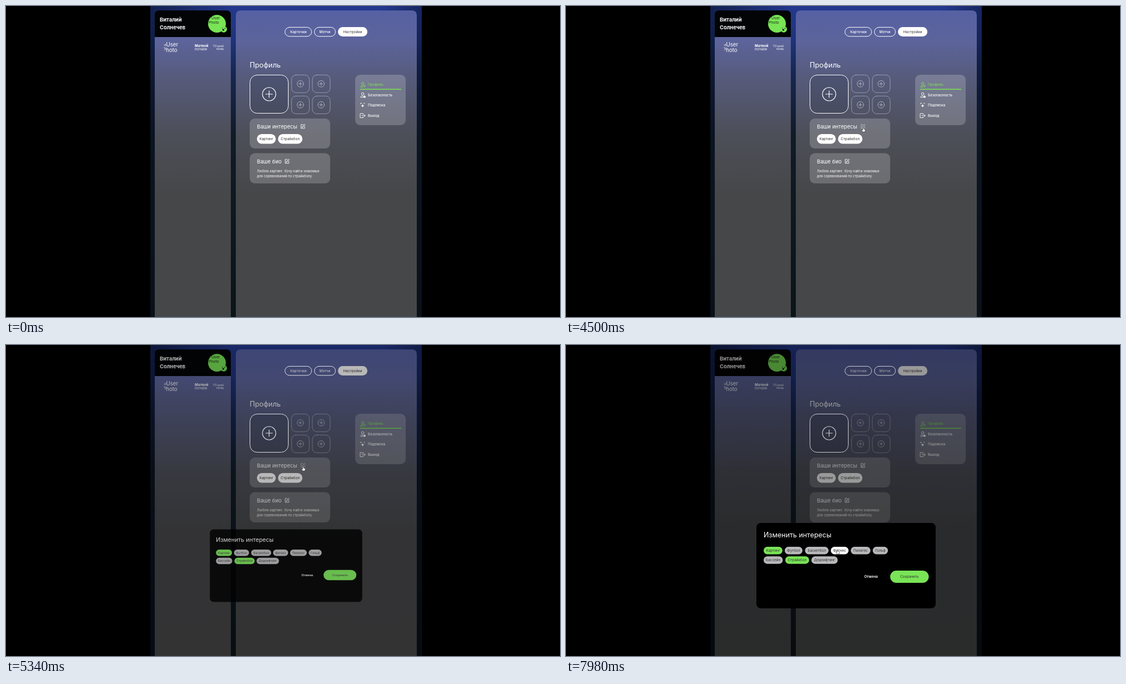
These frames come from a looping animation (998 px wide and 561 px high, 8000 ms). An HTML page:

```html
<!DOCTYPE html>
<html lang="ru">
<head>
<meta charset="utf-8">
<title>Профиль</title>
<style>
  html, body { margin: 0; width: 100%; height: 100%; overflow: hidden; background: #000; }
  svg { display: block; width: 100vw; height: 100vh; font-family: Inter, "Open Sans", sans-serif; }
  .line { fill: none; stroke: #fff; stroke-linecap: round; stroke-linejoin: round; }
</style>
</head>
<body>
<svg id="stage" viewBox="0 0 998 561">
  <defs>
    <linearGradient id="pageFill" gradientUnits="userSpaceOnUse" x1="0" y1="0" x2="0" y2="561">
      <stop offset="0" stop-color="#24388f"/><stop offset=".1" stop-color="#1f347d"/>
      <stop offset=".22" stop-color="#172650"/><stop offset=".42" stop-color="#101b27"/>
      <stop offset="1" stop-color="#0c1418"/>
    </linearGradient>
    <linearGradient id="pageEdges">
      <stop offset="0" stop-color="#050d1c" stop-opacity=".55"/><stop offset=".3" stop-color="#050d1c" stop-opacity="0"/>
      <stop offset=".85" stop-color="#050d1c" stop-opacity="0"/><stop offset="1" stop-color="#050d1c" stop-opacity=".4"/>
    </linearGradient>
    <linearGradient id="panelFill" gradientUnits="userSpaceOnUse" x1="0" y1="8" x2="0" y2="561">
      <stop offset="0" stop-color="#5661a3"/><stop offset=".1" stop-color="#5c649b"/>
      <stop offset=".22" stop-color="#565b7b"/><stop offset=".4" stop-color="#4d4f59"/>
      <stop offset=".6" stop-color="#464749"/><stop offset="1" stop-color="#464748"/>
    </linearGradient>
    <clipPath id="avatarClip"><circle cx="298" cy="73" r="14"/></clipPath>
  </defs>
  <g id="page"></g>
  <rect id="shade" x="260" width="489" height="561"/>
  <g id="outlines" class="line"></g>
  <g id="dialog"></g>
  <g id="cursor">
    <path id="hand" fill="#fff" stroke="#111" stroke-width=".5" stroke-linejoin="round"
      d="M-.8 .2Q0-.6.8.2V3L3.4 3.6Q4 3.9 3.8 5L3.2 8H-.8L-2.8 5Q-2.8 4-1.8 4.4L-.8 5.2Z"/>
    <path id="arrow" fill="#fff" stroke="#111" stroke-width=".5" d="M0 0V6.6L1.5 5.2 2.5 7.4 3.5 7 2.5 4.8H4.6Z"/>
  </g>
</svg>
<script>
const $ = id => document.getElementById(id);
const GREEN = '#79e456';

const text = (x, y, size, content, { fill = '#fff', weight = 400, anchor = 'start' } = {}) =>
  `<text x="${x}" y="${y}" font-size="${size}" fill="${fill}" font-weight="${weight}" text-anchor="${anchor}">${content}</text>`;
const box = (x, y, w, h, r, attrs = 'fill="#fff"') =>
  `<rect x="${x}" y="${y}" width="${w}" height="${h}" rx="${r}" ${attrs}/>`;
const line = (d, width = 1, attrs = '') => `<path class="line" d="${d}" stroke-width="${width}" ${attrs}/>`;
const card = (x, y, w, h) => box(x, y, w, h, 9, 'fill="#fff" fill-opacity=".2"');
const pill = (x, y, w, h, label, { fill = '#fff', color = '#333', size = 6.4, id = '' } = {}) =>
  box(x, y, w, h, h / 2, `fill="${fill}" id="${id}"`) +
  text(x + w / 2, y + h / 2 + size * .36, size, label, { fill: color, anchor: 'middle' });

const plus = (x, y, r, width, attrs = '') =>
  `<g class="line" stroke-width="${width}" ${attrs}><circle cx="${x}" cy="${y}" r="${r}"/>
   <path d="M${x - r / 2} ${y}h${r}M${x} ${y - r / 2}v${r}"/></g>`;
const pencil = (x, y, id) => `<g id="${id}" transform="translate(${x} ${y})">
  ${line('M4 .5H.5V7.5H7V4M2.5 5.5L2.8 4 6.7 0 7.8 1.1 4 5.1Z', .9)}</g>`;
const person = (x, y, color, badge) => `<g transform="translate(${x} ${y})" class="line" style="stroke:${color}" stroke-width=".9">
  <circle cx="4" cy="2.4" r="2.2"/><path d="M4.2 8.8H.5Q.2 6 4 6"/>${badge}</g>`;
const star = (x, y, r) => `<path fill="#fff" d="M${x} ${y - r}Q${x} ${y} ${x + r} ${y}Q${x} ${y} ${x} ${y + r}Q${x} ${y} ${x - r} ${y}Q${x} ${y} ${x} ${y - r}"/>`;

const sidebar = `
  <path d="M268 56H405V561H268Z" fill="url(#panelFill)"/>
  <path d="M268 56V16Q268 8 276 8H397Q405 8 405 16V56Z" fill="#030405"/>
  ${text(277, 28.4, 9.4, 'Виталий', { weight: 700 })}
  ${text(277, 41.8, 9.4, 'Солнечев', { weight: 700 })}
  <circle cx="380" cy="32" r="16" fill="${GREEN}"/>
  ${line('M366.5 20.5l2 1.5', .7, 'style="stroke:#274"')}
  ${text(370, 23.6, 6.8, 'User', { fill: '#1c2b18' })}
  ${text(365, 32.4, 6.8, 'Photo', { fill: '#1c2b18' })}
  <circle cx="392.3" cy="42" r="5.8" fill="${GREEN}"/>
  <g fill="#142010"><circle cx="391.4" cy="43" r="1.7"/><circle cx="394.3" cy="40.3" r=".9"/><circle cx="389.9" cy="39.8" r=".7"/></g>
  <g clip-path="url(#avatarClip)">
    ${line('M285 70.5l3 -2v3z', .6)}
    ${text(288.5, 73, 9.7, 'User')}${text(282, 83, 9.7, 'Photo')}
  </g>
  ${text(340, 73.8, 6.4, 'Матвей', { weight: 700 })}
  ${text(340, 79.8, 5.6, 'погнали')}
  ${text(392, 73.8, 4.7, '113 дней', { anchor: 'end' })}
  ${text(392, 78.8, 4.7, 'назад', { anchor: 'end' })}`;

const smallSlots = [[514, 124], [551.5, 124], [514, 162], [551.5, 162]].map(([x, y]) =>
  box(x + .4, y + .4, 32, 32, 8, 'class="line" stroke-width=".7" opacity=".55"') +
  plus(x + 16.3, y + 16.3, 5.8, .8, 'opacity=".65"')).join('');

const menu = card(629, 124, 91, 91) +
  person(638.5, 137.5, GREEN, '<circle cx="7" cy="7" r="1.7"/>') +
  person(638.5, 156, '#fff', '<path d="M5.8 7h3v2h-3zM6.4 7v-1h1.8v1" fill="#fff"/>') +
  star(642.4, 180, 3.8) + star(639.5, 175.8, 1.8) + star(645.3, 175.8, 1.5) +
  line('M643.5 195.5V194H638V201.5H643.5V200M641 197.8H647M645.2 195.8l2 2-2 2', .9) +
  text(652, 144, 6.4, 'Профиль', { fill: GREEN }) +
  box(638, 149.6, 74, 1.4, .5, `fill="${GREEN}"`) +
  ['Безопасность', 'Подписка', 'Выход'].map((label, i) =>
    text(652, 162.5 + i * 18.7, 6.4, label, { weight: 500 })).join('');

$('page').innerHTML = `
  <rect x="260" width="489" height="561" fill="url(#pageFill)"/>
  <rect x="260" width="489" height="561" fill="url(#pageEdges)"/>
  ${sidebar}
  <path d="M414 561V17Q414 8 423 8H731Q740 8 740 17V561Z" fill="url(#panelFill)"/>
  ${text(526.7, 48.7, 6.35, 'Карточки', { anchor: 'middle', weight: 500 })}
  ${text(574.4, 48.7, 6.35, 'Мэтчи', { anchor: 'middle', weight: 500 })}
  ${pill(598, 38, 53, 17, 'Настройки')}
  ${text(439, 111.3, 12.8, 'Профиль')}
  ${box(439.5, 124.5, 69, 69, 13, 'fill="#1b2540" fill-opacity=".16"')}
  ${smallSlots}${menu}
  ${card(439, 203, 145, 54)}
  ${text(452, 221, 9.5, 'Ваши интересы')}${pencil(531, 213.3, 'edit')}
  ${pill(452, 231, 34, 17.5, 'Картинг')}${pill(490, 231, 44, 17.5, 'Страйкбол')}
  ${card(439, 265.5, 145, 54.5)}
  ${text(452, 284, 9.5, 'Ваше био')}${pencil(502.5, 276.3, 'editBio')}
  ${text(452, 300.4, 6, 'Люблю картинг. Хочу найти знакомых')}
  ${text(452, 309.4, 6, 'для соревнований по страйкболу.')}`;

$('outlines').innerHTML =
  box(502.5, 38.4, 48, 16.4, 8.2, '') + box(555.5, 38.4, 38, 16.4, 8.2, '') +
  box(439.5, 124.5, 69, 69, 13, '') + plus(474, 159, 12, 1.2);

const chips = [
  [356, 364, 34, 'Картинг', true], [394, 364, 32, 'Футбол'], [430.5, 364, 42.5, 'Баскетбол'],
  [477, 364, 32, 'Фитнес'], [513, 364, 35.5, 'Пилатес'], [552.5, 364, 27.5, 'Гольф'],
  [356, 381.3, 34.5, 'Бассейн'], [395, 381.3, 43, 'Страйкбол', true], [442, 381.3, 47.5, 'Дедлифтинг']
];
$('dialog').innerHTML = box(343, 321, 323, 154, 8, 'fill="#000"') +
  text(356, 347, 12.45, 'Изменить интересы') +
  chips.map(([x, y, w, label, chosen], i) =>
    pill(x, y, w, 13.4, label, { fill: chosen ? GREEN : '#b9b9bc', id: 'chip' + i })).join('') +
  text(549.5, 419.8, 6.4, 'Отмена', { weight: 600, anchor: 'middle' }) +
  pill(584, 407, 69.5, 22, 'Сохранить', { fill: GREEN });

// Pointer stops: time, x, y
const stops = [
  [840, 630, 50], [1560, 646, 118], [2300, 640, 152], [2700, 636, 159.5], [3340, 636, 159.5],
  [4080, 545, 214], [4400, 535.2, 219], [5860, 535.2, 219], [6450, 551.5, 359.5],
  [6800, 551.5, 359.5], [7400, 540, 361.5], [7900, 489, 369], [8000, 489, 369]
];
const clamp = v => Math.max(0, Math.min(1, v));
const ease = v => v * v * (3 - 2 * v);
const inside = ([px, py], x, y, w, h) => px >= x && px <= x + w && py >= y && py <= y + h;

function pointerAt(t) {
  const i = Math.max(1, stops.findIndex(s => s[0] > t));
  const [t0, x0, y0] = stops[i - 1], [t1, x1, y1] = stops[i];
  const k = ease(clamp((t - t0) / (t1 - t0)));
  return [x0 + (x1 - x0) * k, y0 + (y1 - y0) * k];
}

function draw(t) {
  const open = clamp((t - 5150) / 300);
  $('shade').setAttribute('opacity', .4 * ease(open));
  $('outlines').setAttribute('opacity', 1 - .25 * open);
  const scale = .5 + .5 * ease(open);
  $('dialog').setAttribute('opacity', ease(clamp(open * 1.1)));
  $('dialog').setAttribute('transform', `translate(504.5 398) scale(${scale}) translate(-504.5 -398)`);

  const pointer = pointerAt(t);
  const onEdit = inside(pointer, 529, 211, 12, 13);
  let hot = onEdit || (open === 0 && inside(pointer, 634, 133, 80, 70));
  $('edit').setAttribute('opacity', onEdit ? .5 : 1);
  chips.forEach(([x, y, w, , chosen], i) => {
    const over = open === 1 && inside(pointer, x, y, w, 13.4);
    hot = hot || over;
    $('chip' + i).setAttribute('fill', chosen ? GREEN : over ? '#fff' : '#b9b9bc');
  });
  $('cursor').setAttribute('transform', `translate(${pointer})`);
  $('cursor').setAttribute('visibility', t < 840 ? 'hidden' : 'visible');
  $('hand').setAttribute('display', hot ? 'inline' : 'none');
  $('arrow').setAttribute('display', hot ? 'none' : 'inline');
}

function tick(now) {
  draw(now % 8000);
  requestAnimationFrame(tick);
}
draw(0);
requestAnimationFrame(tick);
</script>
</body>
</html>
```
